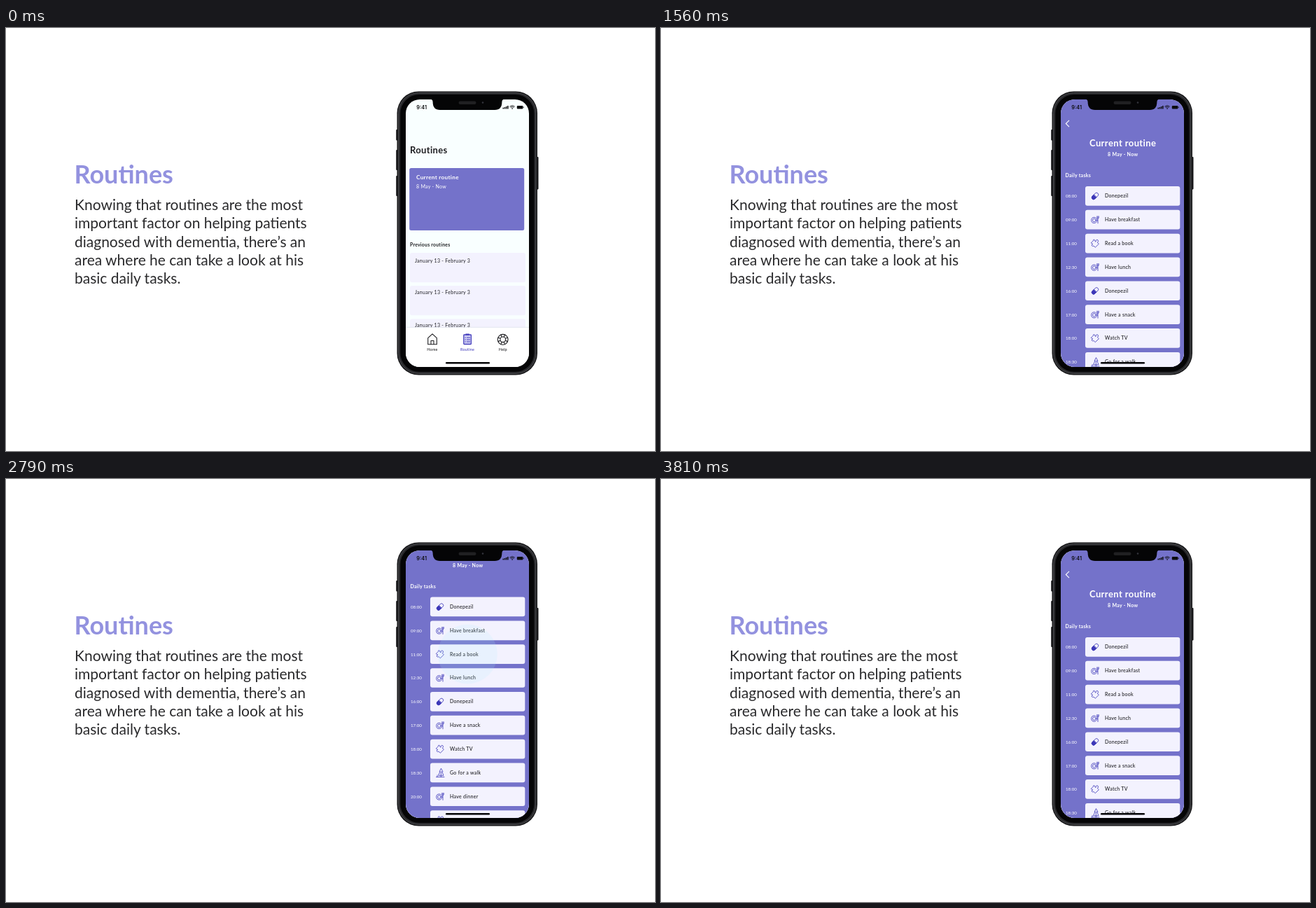
An HTML page for the animation above (4.26 s loop, 927 by 604 pixels).

```html
<!DOCTYPE html>
<html lang="en">
<head>
<meta charset="utf-8">
<title>Routines</title>
<style>
  html, body { margin: 0; width: 100%; height: 100%; overflow: hidden; background: #fff; }
  svg { display: block; font-family: Lato, "Open Sans", sans-serif; }
  .copy { font-size: 21px; fill: #2a2a2c; }
  .small { font-size: 7px; letter-spacing: .04em; }
  .bold { font-weight: 700; }
  .ink { fill: #1f1f22; }
  .white { fill: #fff; }
  .mid { text-anchor: middle; }
  .tab { font-size: 5.4px; letter-spacing: .04em; font-weight: 500; text-anchor: middle; }
  .line { fill: none; stroke: #1f1f22; stroke-width: 1.1; stroke-linejoin: round; }
  .icon { fill: none; stroke: #3c37b8; stroke-width: .8; stroke-linejoin: round; stroke-linecap: round; }
  .icon .solid { fill: #3c37b8; }
</style>
</head>
<body>
<svg width="927" height="604" viewBox="0 0 927 604">
  <defs>
    <clipPath id="screen"><rect x="571" y="102" width="176" height="382" rx="20"/></clipPath>
    <g id="pill" class="icon" transform="rotate(-45)">
      <rect x="-5.6" y="-2.6" width="11.2" height="5.2" rx="2.6"/>
      <path class="solid" d="M0-2.6H-3A2.6 2.6 0 0 0-3 2.6H0Z"/>
    </g>
    <g id="meal" class="icon">
      <circle cx="-1.2" cy=".6" r="4.1"/><circle cx="-1.2" cy=".6" r="2.3"/>
      <path d="M4-5V5M2.8-5V-2.4Q4-1 5.2-2.4V-5"/>
    </g>
    <g id="puzzle" class="icon">
      <path d="M-5.5-1L-2.6-3.9Q-3-5.5-1.6-5.5T-.6-3.9L1-2.4Q.6-5 2.5-5.3T4.6-3.2Q4.4-2 3.2-1.6L5.4.6L.3 5.5L-2 3.4Q-3.9 4.4-4.7 3T-3.5 1Z"/>
    </g>
    <g id="tree" class="icon">
      <path d="M1.3-6L-1-1.5H-.2L-2.4 3.8H5L2.8-1.5H3.6ZM1.3-2V6M-5.5 6H6M-4 6V3.5"/>
    </g>
  </defs>

  <text x="97.5" y="222" class="bold" font-size="36" fill="#9392df">Routines</text>
  <g id="copy" class="copy"></g>

  <g fill="#161618">
    <rect x="557.2" y="145" width="4" height="15.500" rx="1"/>
    <rect x="557.2" y="174" width="4" height="29" rx="1"/>
    <rect x="557.2" y="211" width="4" height="29" rx="1"/>
    <rect x="756.500" y="184" width="4" height="46.500" rx="1"/>
    <rect x="558.500" y="90.500" width="200.500" height="405" rx="31"/>
  </g>
  <rect x="560.5" y="92.500" width="196.500" height="401" rx="29" fill="#29292c" stroke="#505154" stroke-width=".9"/>
  <rect x="563.2" y="95" width="191.200" height="396" rx="27" fill="#050506"/>

  <g clip-path="url(#screen)">
    <rect x="571" y="102" width="176" height="382" fill="#f9ffff"/>
    <text x="577" y="178.700" class="bold ink" font-size="13" letter-spacing=".35">Routines</text>
    <text x="577" y="312" class="bold ink" font-size="6.8" letter-spacing=".28">Previous routines</text>
    <g id="past"></g>
    <rect x="571" y="426.800" width="176" height="2" fill="#dfe4ec" opacity=".6"/>
    <rect x="571" y="428" width="176" height="56" fill="#fff"/>
    <path class="line" d="M602.700 451.700V442.700L609 436.800L615.300 442.700V451.700ZM607 451.700V446.500H611V451.700"/>
    <g fill="none" stroke="#4640bd">
      <rect x="653.800" y="438" width="10.600" height="13.500" rx=".8" stroke-width="1.300" fill="#cfcdf3"/>
      <path d="M656.500 437.600H661.700" stroke-width="2.400"/>
      <path d="M655.500 442H657M658 442H663M655.500 445H657M658 445H663M655.500 448H657M658 448H663" stroke-width="1.100"/>
    </g>
    <g class="line">
      <circle cx="709.700" cy="444.800" r="7.400"/><circle cx="709.700" cy="444.800" r="3.800"/>
      <path id="spokes"/>
    </g>
    <text x="609" y="461" class="tab ink">Home</text>
    <text x="659" y="461" class="tab" fill="#4640bd">Routine</text>
    <text x="709.700" y="461" class="tab ink">Help</text>

    <rect id="card" rx="2.5" fill="#7472ca"/>
    <g id="cardText" class="white">
      <text x="586" y="215.800" class="bold" font-size="8.2" letter-spacing=".3">Current routine</text>
      <text x="586" y="229" class="small">8 May - Now</text>
    </g>

    <g id="detail">
      <path d="M583 131.800L578.300 136.500L583 141.200" fill="none" stroke="#fff" stroke-width="1.100"/>
      <text x="659.700" y="168.600" class="bold white mid" font-size="13" letter-spacing=".4">Current routine</text>
      <text x="659.700" y="183.400" class="small bold white mid">8 May - Now</text>
      <text x="577.500" y="213" class="small bold white">Daily tasks</text>
      <g id="tasks"></g>
    </g>

    <circle id="halo"/>
    <circle id="core"/>

    <text x="586.300" y="115.600" font-family="Inter, sans-serif" font-weight="600" font-size="7.300" fill="#0c0c0e">9:41</text>
    <g fill="#0c0c0e">
      <path d="M709.500 115.600v-1.800h1.500v1.800zM711.700 115.600v-2.700h1.500v2.700zM713.900 115.600v-3.600h1.500v3.600zM716.100 115.600v-4.700h1.500v4.700z"/>
      <rect x="729.800" y="111" width="8.600" height="4.500" rx="1"/>
      <rect x="738.800" y="112.400" width=".8" height="1.700"/>
      <path d="M721.900 114.700L723.100 115.900L724.300 114.700Q723.100 113.700 721.900 114.700"/>
    </g>
    <path d="M720.700 113.500Q723.100 111.500 725.500 113.500M719.500 112.200Q723.100 109.200 726.700 112.200" fill="none" stroke="#0c0c0e" stroke-width=".9"/>
    <path d="M605 101.500Q609.600 101.500 609.600 105.500Q609.600 117 620 117H698Q708.400 117 708.400 105.500Q708.400 101.500 713 101.500Z" fill="#050506"/>
    <rect x="628" y="477" width="63" height="2.500" rx="1.250" fill="#050506"/>
  </g>
  <rect x="646.500" y="104.500" width="25" height="4.500" rx="2.200" fill="#202022"/>
  <circle cx="681" cy="106.500" r="1.300" fill="#34363c"/>
</svg>
<script>
const LOOP = 4260, SCROLL = 70;
const $ = id => document.getElementById(id);
const set = (el, attrs) => { for (const k in attrs) el.setAttribute(k, attrs[k]); };
const mix = (a, b, p) => a + (b - a) * p;
const span = (t, a, b) => Math.min(1, Math.max(0, (t - a) / (b - a)));
const easeOut = p => 1 - (1 - p) ** 2;
const sine = p => .5 - .5 * Math.cos(Math.PI * p);
const swell = p => p < .5 ? Math.SQRT2 * p ** 1.5 : 1 - Math.SQRT2 * (1 - p) ** 1.5;

const copy = [
  'Knowing that routines are the most',
  'important factor on helping patients',
  'diagnosed with dementia, there’s an',
  'area where he can take a look at his',
  'basic daily tasks.'
];
$('copy').innerHTML = copy.map((s, i) =>
  `<text x="98" y="${260 + i * 26.35}">${s}</text>`).join('');

$('past').innerHTML = [[321, 335], [368, 380.2], [415.5, 427.4]].map(([top, base]) =>
  `<rect x="577" y="${top}" width="165" height="42.300" rx="3" fill="#f3f2fe"/>
   <text x="584" y="${base}" class="small ink">January 13 - February 3</text>`).join('');

const tasks = [
  ['08:00', 'pill', 'Donepezil'],
  ['09:00', 'meal', 'Have breakfast'],
  ['11:00', 'puzzle', 'Read a book'],
  ['12:30', 'meal', 'Have lunch'],
  ['16:00', 'pill', 'Donepezil'],
  ['17:00', 'meal', 'Have a snack'],
  ['18:00', 'puzzle', 'Watch TV'],
  ['18:30', 'tree', 'Go for a walk'],
  ['20:00', 'meal', 'Have dinner'],
  ['21:00', 'puzzle', 'Listen to music']
];
$('tasks').innerHTML = tasks.map(([time, icon, name], i) => `
  <g transform="translate(0 ${226 + i * 33.85})">
    <text x="578" y="16.300" class="white" font-size="6.200">${time}</text>
    <rect x="606" width="135.300" height="27.700" rx="3" fill="#f3f2fe"/>
    <use href="#${icon}" x="620" y="14"/>
    <text x="634" y="16.300" class="small ink" font-weight="500">${name}</text>
  </g>`).join('');

$('spokes').setAttribute('d', Array.from({ length: 8 }, (_, i) => {
  const a = (i + .5) * Math.PI / 4;
  const at = r => `${709.7 + r * Math.cos(a)} ${444.8 + r * Math.sin(a)}`;
  return `M${at(3.8)}L${at(7.4)}`;
}).join(''));

function scrollAt(t) {
  return SCROLL * (t < 3060 ? sine(span(t, 2250, 3000)) : 1 - easeOut(span(t, 3060, 3810)));
}

// Each touch: start, release, end of ripple, and its height over time.
const touches = [
  [540, 900, 1140, () => 248],
  [2160, 2640, 2820, t => mix(340, 250, sine(span(t, 2230, 2660)))],
  [2940, 3480, 3720, t => 324.5 - scrollAt(t)]
];

function drawTouch(t) {
  const touch = touches.find(([start, , end]) => t >= start && t < end);
  const halo = $('halo'), core = $('core');
  halo.style.display = core.style.display = touch ? '' : 'none';
  if (!touch) return;
  const [start, release, end, height] = touch;
  const cx = 659.3, cy = height(t);
  const press = span(t, start, start + 150), out = span(t, release, end);
  set(core, {
    cx, cy, r: out ? mix(23, 43, easeOut(out)) : mix(25, 23, press),
    fill: out ? '#a8e8fb' : '#66e8ff',
    opacity: mix(.45, .95, press) * (1 - out)
  });
  set(halo, {
    cx, cy, r: mix(25, 29, press) + 14 * easeOut(out), fill: '#8ae9fb',
    opacity: .7 * press * (1 - span(out, 0, .5))
  });
}

function draw(t) {
  const grow = swell(span(t, 1050, 1560));
  const w = mix(82, 133, grow), h = mix(44.5, 273, grow);
  set($('card'), { x: 658.2 - w, y: 244.4 - h, width: 2 * w, height: 2 * h });
  $('cardText').setAttribute('opacity', 1 - span(t, 1080, 1160));
  set($('detail'), {
    opacity: sine(span(t, 1130, 1560)),
    transform: `translate(0 ${-scrollAt(t)})`
  });
  drawTouch(t);
}

const begin = performance.now();
function tick() {
  draw((performance.now() - begin) % LOOP);
  requestAnimationFrame(tick);
}
tick();
</script>
</body>
</html>
```
